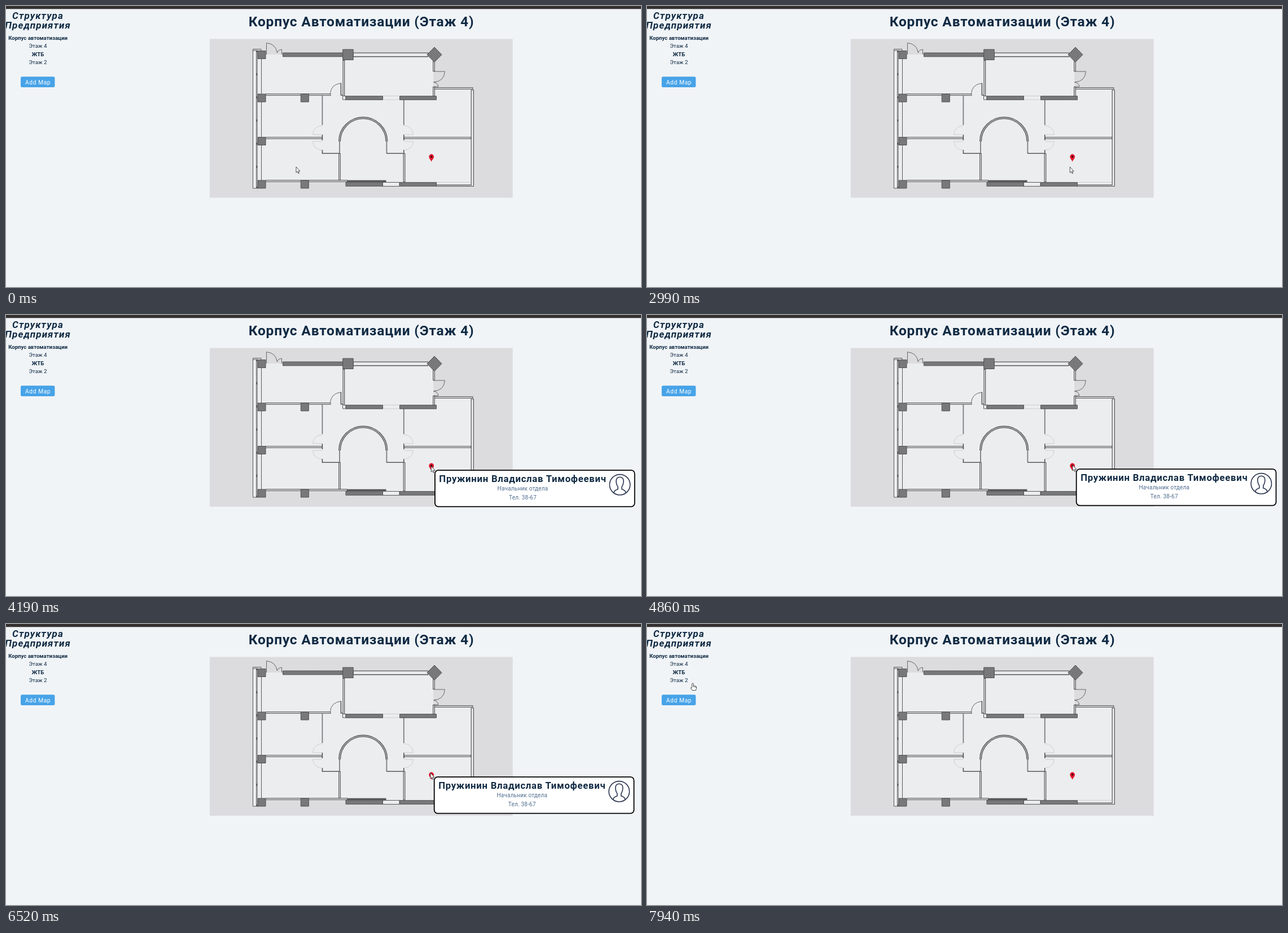
Animation of 1125x498 px, one loop 8000 ms. Source, as an HTML page:

```html
<!DOCTYPE html>
<html lang="ru">
<head>
<meta charset="utf-8">
<title>Структура предприятия</title>
<style>
  html, body { margin: 0; width: 100%; height: 100%; overflow: hidden; background: #f0f4f7; }
  svg { display: block; width: 1125px; height: 498px; }
  text { font-family: Roboto, sans-serif; font-size: 9.8px; text-anchor: middle; fill: #102a43; }
  .bold { font-weight: 700; }
  .line { fill: none; stroke: #58585a; }
  .hatch { fill: url(#hatch); stroke: #505052; }
  .door { fill: none; stroke: #c6c6c8; stroke-width: .8; }
  #card text { font-size: 10px; fill: #4f6d8f; letter-spacing: .2px; }
  #card .name { font-size: 16.7px; fill: #102a43; letter-spacing: .75px; }
</style>
</head>
<body>
<svg viewBox="0 0 1125 498">
  <defs>
    <pattern id="hatch" width="3" height="3" patternUnits="userSpaceOnUse" patternTransform="rotate(40)">
      <rect width="3" height="3" fill="#858587"/>
      <path d="M0 1H3" stroke="#656567" stroke-width="1.2"/>
    </pattern>
  </defs>

  <rect width="1125" height="5.3" fill="#33302f"/>

  <g class="bold" font-style="italic">
    <text x="56.5" y="23" style="font-size:17px;letter-spacing:1.1px">Структура</text>
    <text x="56.5" y="39.5" style="font-size:17px;letter-spacing:1.1px">Предприятия</text>
  </g>
  <text class="bold" x="56.5" y="60" style="font-size:9.6px">Корпус автоматизации</text>
  <text x="56.5" y="74.3">Этаж 4</text>
  <text class="bold" x="56.5" y="88.6">ЖТБ</text>
  <text x="56.5" y="103">Этаж 2</text>
  <rect x="26" y="125.3" width="60.4" height="18.6" rx="2.5" fill="#47a3e8"/>
  <text x="56.6" y="138.6" style="font-size:10.2px;letter-spacing:.6px;fill:#fff">Add Map</text>

  <text class="bold" x="629.5" y="36" style="font-size:24.5px;letter-spacing:.8px">Корпус Автоматизации (Этаж 4)</text>

  <!-- floor plan -->
  <rect x="361" y="58.5" width="536.7" height="281.2" fill="#dcdcde"/>
  <path d="M437 79H460V86H490V83H757V145H827V149H829V320H602V312H460V323H437Z" fill="#ecedef"/>
  <g class="line">
    <path d="M437.5 79V323H446M437.5 79H446M437.5 76.5H452V79M437.5 76.5V79M452.5 93V309" stroke-width="1"/>
    <path d="M444.3 79V323" stroke-width="2.6"/>
    <path d="M444.3 82V320" stroke="#d0d0d2" stroke-width=".9" stroke-dasharray="37 4"/>
    <g stroke-width="3.8">
      <path d="M460 157.2H575.5M598.3 96V160M452.5 233.8H560.5M705 233.8H824M591 261V309M705.5 261V312M460 310.2H605M758 97V116M758 143V160M759 146.2H827.5"/>
      <path d="M615 86.4H748" stroke-width="8"/>
      <path d="M826.3 148.5V319.5" stroke-width="5.4"/>
      <path d="M762 318.3H829" stroke-width="3.4"/>
    </g>
    <g stroke="#e9e9eb" stroke-width="1.4">
      <path d="M460 157.2H574.5M598.3 97V159M452.5 233.8H559.5M706 233.8H823M591 262V308M705.5 262V311M460 310.2H604M758 98V115M758 144V159M760 146.2H826.5"/>
      <path d="M616 86.4H747" stroke-width="5.4"/>
      <path d="M826.3 149.5V318.5" stroke-width="3"/>
      <path d="M762 318.3H828" stroke-width="1"/>
    </g>
    <path d="M591 240A41.7 41.7 0 0 1 674.4 240" stroke-width="4"/>
    <path d="M591 240A41.7 41.7 0 0 1 674.4 240" stroke="#a5a5a7" stroke-width="1.8"/>
    <path d="M560.4 159V211M704.8 166V211M591 239V261M674.4 239V261" stroke="#7d7d7f" stroke-width="1.8"/>
    <path d="M560.4 228V238M560.4 255V261.3H591M704.8 228V238M704.8 255V261.3H674M593.4 136.5V158H597" stroke-width="1.6"/>
    <path d="M461.5 86V65.5Q478 67 480.5 83M480.5 83Q481 78 488.5 77V86M574.5 155Q576 139 593 137M757.5 116H777.5Q776 134 757.5 135Q765 136 766 143H757.5" stroke-width=".9"/>
    <path d="M596.5 159.5H602V166H596.5Z" fill="#ecedef"/>
    <path d="M667 312.5H697V319.5H667Z" fill="#ecedef"/>
  </g>
  <path class="door" d="M560 212Q545 213 543.5 228H560M560 240H543.5Q545 254 560 255.5M705 212Q720 213 721.5 228H705M705 240H721.5Q720 254 705 255.5M667 159.5H697M667 166H697M762 312.5H824"/>
  <g class="hatch">
    <path d="M490.5 83H597V89.8H490.5ZM602 159.7H667.5V166.2H602ZM697.5 159.7H762.5V166.2H697.5ZM602 312.7H667.5V319.3H602ZM697.5 312.7H762.5V319.3H697.5Z"/>
    <path d="M446 79.5h14v14h-14zM446 156h14v14h-14zM446 232.5h14v14h-14zM446 309h14v14h-14zM522.3 156h14v14h-14zM522.3 309h14v14h-14zM596.7 77h18.5v18.5h-18.5zM759 73L772 86.3L759 99.5L746 86.3Z"/>
  </g>
  <rect x="605" y="308.7" width="68.5" height="3.4" fill="#58585a"/>

  <path d="M753.7 276C752.5 272.5 749.3 270.5 749.3 267A4.4 4.4 0 0 1 758.1 267C758.1 270.5 754.9 272.5 753.7 276Z" fill="#e2182d"/>
  <circle cx="753.7" cy="267" r="1.7" fill="#33080d"/>

  <g id="card">
    <rect x=".9" y=".9" width="353.8" height="64.4" rx="6" fill="#fff" stroke="#000" stroke-width="1.8"/>
    <text class="name bold" x="156.5" y="22.2">Пружинин Владислав Тимофеевич</text>
    <text x="156.5" y="37">Начальник отдела</text>
    <text x="156.5" y="53">Тел. 38-67</text>
    <g fill="none" stroke="#2c3550" stroke-width="1.6">
      <circle cx="328.5" cy="26.5" r="18.2"/>
      <path d="M318 40.5Q318.5 36.5 325 34.5V30Q322 26 322 20Q322.3 13 328.5 13Q334.7 13 335 20Q335 26 332 30V34.5Q338.5 36.5 339 40.5"/>
    </g>
  </g>

  <g id="cursor" stroke="#222" stroke-width=".8" stroke-linejoin="round" fill="#fff">
    <path id="arrow" d="M0 0V10.2L2.3 8.2L3.9 11.9L5.4 11.3L3.9 7.6H6.8Z"/>
    <path id="hand" d="M-1.3 7.5V.8Q0 -1 1.3 .8V4.5Q2.7 3.7 3.5 5Q5 4.4 5.4 5.8Q6.6 5.6 6.6 7V9.5L5.3 12.6H-.7L-3.7 8.2Q-3.6 6.4-1.3 8.5M1.3 4.5V7M3.5 5V7.3M5.4 5.8V7.6"/>
  </g>
</svg>
<script>
const LOOP = 8000;
const START = [514, 285];
// pointer moves: first change, last change, steps, bend point, end point
const MOVES = [
  [120, 1150, 8, [610, 341], [732, 309]],
  [1300, 1730, 4, [741, 307], [747.5, 298.5]],
  [2730, 3680, 8, [750, 278], [752, 272]],
  [3800, 4490, 6, [753, 268.3], [753.8, 266.2]],
  [4860, 4860, 1, [754, 266], [754, 265.8]],
  [5700, 5700, 1, [754, 265.5], [754.2, 265.3]],
  [6100, 6520, 4, [753.5, 264.5], [752, 263.8]],
  [6660, 7090, 4, [680, 240], [396, 174]],
  [7240, 7940, 6, [190, 110], [81, 105]],
];
const SLACK = 30; // steps are not perfectly even

const el = id => document.getElementById(id);
const show = (node, on) => node.setAttribute('visibility', on ? 'visible' : 'hidden');
const place = (node, x, y) => node.setAttribute('transform', `translate(${x} ${y})`);
const card = el('card'), cursor = el('cursor'), arrow = el('arrow'), hand = el('hand');

function pointerAt(t) {
  let from = START;
  for (const [t0, t1, steps, bend, to] of MOVES) {
    if (t < t0) break;
    const gap = (t1 - t0) / (steps - 1) || 1;
    const p = Math.min(steps, Math.floor((t - t0 + SLACK) / gap) + 1) / steps, q = 1 - p;
    from = from.map((a, i) => q * q * a + 2 * p * q * bend[i] + p * p * to[i]);
    if (p < 1) break;
  }
  return from;
}

function draw(now) {
  const [x, y] = pointerAt(now % LOOP);
  const overPin = Math.abs(x - 753.7) < 5 && y > 261 && y < 275;
  const overLink = x < 100;
  place(cursor, x, y);
  place(card, x + 5.8, y + 6.5);
  show(card, overPin);
  show(arrow, !overLink);
  show(hand, overLink);
  requestAnimationFrame(draw);
}
draw(performance.now());
</script>
</body>
</html>
```
